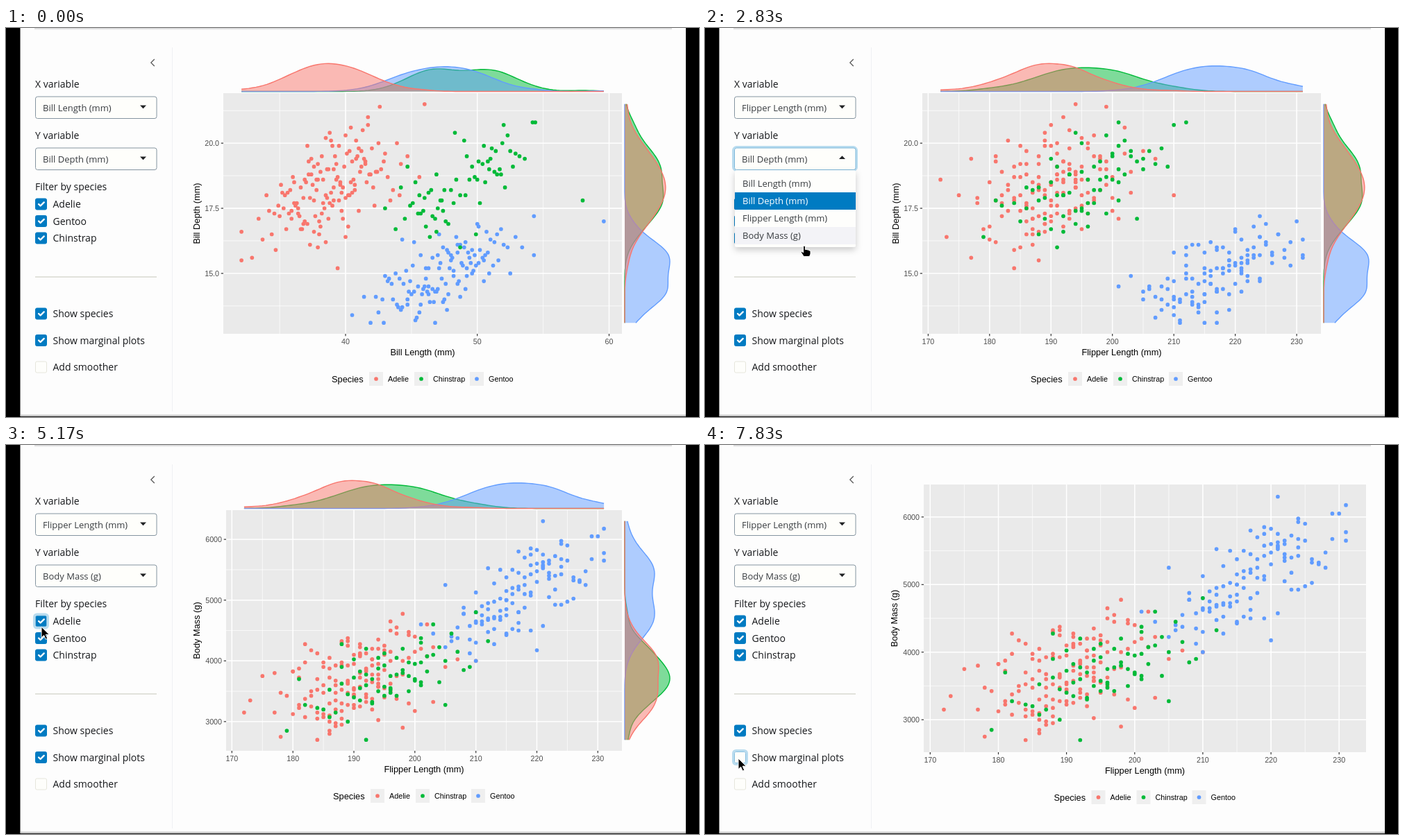
These frames come from a looping animation (998 px wide and 561 px high, 8000 ms). An HTML page:

```html
<!DOCTYPE html>
<html lang="en">
<head>
<meta charset="utf-8">
<title>Penguin explorer</title>
<style>
  html, body { margin: 0; width: 100%; height: 100%; overflow: hidden; background: #000; }
  svg { display: block; width: 100%; height: 100%; }
  text { white-space: pre; }
  #ui text { font-family: "Open Sans", "Noto Sans", sans-serif; font-size: 14px; fill: #15171a; }
  #ui .val { font-size: 13px; fill: #383c40; }
  #ui .picked { fill: #fff; }
  #plots text { font-family: "Liberation Sans", Arial, sans-serif; font-size: 12.8px; fill: #000; }
  #plots .small { font-size: 10.8px; }
  #plots .tick { font-size: 10.7px; fill: #4d4d4d; }
</style>
</head>
<body>
<svg viewBox="0 0 998 561" preserveAspectRatio="none">
  <defs>
    <filter id="shadow" x="-20%" y="-20%" width="140%" height="150%">
      <feDropShadow dx="0" dy="4" stdDeviation="5" flood-opacity=".2"/>
    </filter>
    <linearGradient id="fade" x2="0" y2="1">
      <stop offset="0" stop-color="#cfcfd0"/><stop offset="1" stop-color="#fdfdfd"/>
    </linearGradient>
  </defs>
  <rect width="998" height="561"/>
  <rect x="20.5" width="958.5" height="560" fill="#fdfdfd"/>
  <rect x="41" width="918" height="3" fill="url(#fade)"/>
  <path d="M239.5 28V553" stroke="#eff0f4"/>
  <path d="M20.5 558.5H979" stroke="#a3a3a3"/>
  <g id="plots"></g>
  <g id="ui"></g>
  <g id="cursor" stroke="#fff" stroke-width="1" stroke-linejoin="round"></g>
</svg>
<script>
const LOOP = 8000, STEP = LOOP / 48, GLIDE = 330;
const VARS = [
  { name: 'Bill Length (mm)', tick: 10, round: 0.1 },
  { name: 'Bill Depth (mm)', tick: 2.5, round: 0.1, digits: 1 },
  { name: 'Flipper Length (mm)', tick: 10, round: 1 },
  { name: 'Body Mass (g)', tick: 1000, round: 25 }
];
const HUES = { 2: ['#F8766D', '#00BFC4'], 3: ['#F8766D', '#00BA38', '#619CFF'] };

// Per variable: mean, half the gap between the sexes, spread within a sex.
// The extreme birds set the ends of the axes.
const SPECIES = [
  {
    name: 'Adelie', n: 146, width: 65,
    stats: [[38.8, 1.6, 2.1], [18.3, 0.72, 0.95], [190, 2.3, 6.1], [3700, 335, 305]],
    extremes: [[46, 21.5, 194, 4200], [32.1, 15.5, 188, 3050], [37.9, 18.6, 172, 3150], [44.1, 18, 210, 4000]]
  },
  {
    name: 'Gentoo', n: 119, width: 63,
    stats: [[47.4, 1.9, 2.1], [15, 0.74, 0.6], [217, 4.4, 4.7], [5080, 400, 290]],
    extremes: [[59.6, 17, 230, 6050], [49.2, 15.2, 221, 6300], [54.3, 15.7, 231, 5650], [42.9, 13.1, 215, 5000]]
  },
  {
    name: 'Chinstrap', n: 68, width: 80,
    stats: [[48.7, 2.25, 1.6], [18.4, 0.83, 0.72], [195.8, 4.1, 5.7], [3730, 205, 310]],
    extremes: [[58, 17.8, 181, 3700], [54.2, 20.8, 201, 4300], [46.9, 16.6, 192, 2700], [52, 20.7, 210, 4800]]
  }
];

let seed = 2024;
function rnd() {
  seed = (seed + 0x6D2B79F5) | 0;
  let r = Math.imul(seed ^ seed >>> 15, 1 | seed);
  r = r + Math.imul(r ^ r >>> 7, 61 | r) ^ r;
  return ((r ^ r >>> 14) >>> 0) / 4294967296;
}
// Inverse normal distribution, by Tukey's lambda.
const probit = u => (u ** 0.135 - (1 - u) ** 0.135) / 0.1975;
const range = n => Array.from({ length: n }, (_, i) => i);
const byName = (a, b) => a.name < b.name ? -1 : 1;
const extent = (rows, j) => [Math.min(...rows.map(r => r[j])), Math.max(...rows.map(r => r[j]))];
const f = v => v.toFixed(1);

const limits = VARS.map((_, j) => extent(SPECIES.flatMap(sp => sp.extremes), j));

// A shared size correlates the measurements; spacing the ranks evenly keeps each one normal.
function birds(sp, sex, n) {
  const z = range(n).map(() => {
    const size = probit(rnd());
    return VARS.map(() => 0.55 * size + 0.83 * probit(rnd()));
  });
  const rows = z.map(() => []);
  VARS.forEach(({ round }, j) => {
    const [mean, gap, sd] = sp.stats[j], [lo, hi] = limits[j];
    range(n).sort((a, b) => z[a][j] - z[b][j]).forEach((i, k) => {
      const v = mean + sex * gap + sd * probit((k + 0.5) / n);
      rows[i][j] = Math.min(hi, Math.max(lo, Math.round(v / round) * round));
    });
  });
  return rows;
}
SPECIES.forEach(sp => {
  const half = (sp.n - sp.extremes.length) >> 1;
  sp.rows = [...birds(sp, -1, half), ...birds(sp, 1, half), ...sp.extremes];
});

function density(vals, lo, hi) {
  const n = vals.length, s = [...vals].sort((a, b) => a - b);
  const mean = s.reduce((a, b) => a + b) / n;
  const sd = Math.sqrt(s.reduce((a, b) => a + (b - mean) ** 2, 0) / (n - 1));
  const iqr = s[Math.floor(n * 0.75)] - s[Math.floor(n * 0.25)];
  const bw = 0.9 * Math.min(sd, iqr / 1.34) * n ** -0.2;
  return range(101).map(i => {
    const x = lo + (hi - lo) * i / 100;
    return [x, s.reduce((a, v) => a + Math.exp(-0.5 * ((x - v) / bw) ** 2), 0) / (n * bw)];
  });
}

const rect = (x, y, w, h, fill, more = '') =>
  `<rect x="${f(x)}" y="${f(y)}" width="${f(w)}" height="${f(h)}" fill="${fill}" ${more}/>`;
const path = (d, stroke, w, more = 'fill="none"') =>
  `<path d="${d}" stroke="${stroke}" stroke-width="${w}" ${more}/>`;
const text = (x, y, s, more = '') => `<text x="${f(x)}" y="${f(y)}" ${more}>${s}</text>`;
const dot = (x, y, fill) => `<circle cx="${f(x)}" cy="${f(y)}" r="2.85" fill="${fill}"/>`;
const line = pts => 'M' + pts.map(p => p.map(f).join(' ')).join('L');

function plot({ x, y, box, groups = SPECIES, margin = 'density', colour = true }) {
  const [L, T, R, B] = box;
  const all = groups.flatMap(g => g.rows), sorted = [...groups].sort(byName);
  const hue = g => colour ? HUES[groups.length][sorted.indexOf(g)] : '#000';
  const [x0, x1] = extent(all, x), [y0, y1] = extent(all, y);
  const px = v => L + (R - L) * (0.05 + (v - x0) / (x1 - x0)) / 1.1;
  const py = v => B - (B - T) * (0.05 + (v - y0) / (y1 - y0)) / 1.1;
  const ticks = (lo, hi, step) => {
    const pad = (hi - lo) * 0.05, first = Math.ceil((lo - pad) / step);
    return range(Math.floor((hi + pad) / step) - first + 1).map(i => (first + i) * step);
  };
  let out = rect(L, T, R - L, B - T, '#EAEAEA');

  for (const [div, w] of [[2, 0.7], [1, 1.4]]) {
    const d = ticks(x0, x1, VARS[x].tick / div).map(v => `M${f(px(v))} ${T}V${B}`)
      .concat(ticks(y0, y1, VARS[y].tick / div).map(v => `M${L} ${f(py(v))}H${R}`));
    out += path(d.join(''), '#fff', w);
  }
  for (const v of ticks(x0, x1, VARS[x].tick)) {
    out += path(`M${f(px(v))} ${B}v3.3`, '#333', 1.2) +
      text(px(v), B + 14.8, v, 'class="tick" text-anchor="middle"');
  }
  for (const v of ticks(y0, y1, VARS[y].tick)) {
    out += path(`M${L} ${f(py(v))}h-3.3`, '#333', 1.2) +
      text(L - 6, py(v) + 3.9, v.toFixed(VARS[y].digits || 0), 'class="tick" text-anchor="end"');
  }
  for (const g of groups) out += g.rows.map(r => dot(px(r[x]), py(r[y]), hue(g))).join('');

  const cx = (L + R) / 2, cy = (T + B) / 2, yx = margin ? 278.8 : 277;
  out += text(cx, B + 30.5, VARS[x].name, 'text-anchor="middle"') +
    text(yx, cy, VARS[y].name, `text-anchor="middle" transform="rotate(-90 ${yx} ${cy})"`);

  if (colour) {
    const ly = B + 65;
    let lx = cx - (54 + groups.reduce((a, g) => a + g.width, 0)) / 2;
    out += text(lx, ly + 5, 'Species');
    lx += 54;
    for (const g of sorted) {
      out += rect(lx, ly - 10, 20, 20, '#EFEFEF') + dot(lx + 10, ly, hue(g)) +
        text(lx + 27, ly + 3.9, g.name, 'class="small"');
      lx += g.width;
    }
  }

  const top = T - 2.5, side = R + 4;
  const sides = [
    { j: x, lo: x0, hi: x1, at: (v, h) => [px(v), top - h * (top - 51.3)] },
    { j: y, lo: y0, hi: y1, at: (v, h) => [side + h * (956 - side), py(v)] }
  ];
  for (const { j, lo, hi, at } of margin ? sides : []) {
    if (margin === 'density') {
      const curves = groups.map(g => density(g.rows.map(r => r[j]), lo, hi));
      const peak = Math.max(...curves.flat().map(p => p[1]));
      groups.map((g, i) => {
        const pts = curves[i].map(([v, h]) => at(v, h / peak));
        return path(line([at(lo, 0), ...pts, at(hi, 0)]), 'none', 0, `fill="${hue(g)}" fill-opacity=".5"`) +
          path(line(pts), hue(g), 1.4);
      }).reverse().forEach(s => { out += s; });
    } else {
      const n = 29, w = (hi - lo) / n, bins = Array(n).fill(0);
      all.forEach(r => bins[Math.min(n - 1, Math.floor((r[j] - lo) / w))]++);
      const peak = Math.max(...bins);
      bins.forEach((c, i) => {
        const a = lo + i * w, h = c / peak;
        out += path(line([at(a, 0), at(a, h), at(a + w, h), at(a + w, 0)]) + 'Z', '#000', 1.4, 'fill="#595959"');
      });
    }
  }
  return out;
}

const MASS = { x: 2, y: 3, box: [317, 94, 887, 441] };
const PLOTS = {
  start: { x: 0, y: 1, box: [313, 94, 887, 441] },
  flipper: { x: 2, y: 1, box: [313, 94, 887, 441] },
  mass: MASS,
  subset: { ...MASS, groups: SPECIES.slice(1) },
  plain: { ...MASS, box: [317, 99, 887, 489], margin: 'bars', colour: false },
  bare: { ...MASS, box: [315, 57, 952, 443], margin: null }
};
const $ = id => document.getElementById(id);
$('plots').innerHTML = Object.entries(PLOTS)
  .map(([k, p]) => `<g id="plot-${k}" display="none">${plot(p)}</g>`).join('');

// State changes by time; "to" sends the cursor gliding to a place.
const EVENTS = [
  [0, { x: 0, y: 1, plot: 'start', adelie: true, species: true, marginal: true, to: [255, 250] }],
  [160, { to: [170, 117] }],
  [490, { hand: true }],
  [660, { open: 'x', focus: 'x', hover: 0 }],
  [830, { to: [163, 209] }],
  [1160, { hover: 2 }],
  [1490, { x: 2, open: '', hand: false }],
  [1660, { to: [152, 190] }],
  [1990, { plot: 'flipper', hand: true }],
  [2160, { open: 'y', focus: 'y', hover: 1, to: [143, 314] }],
  [2490, { hover: 3 }],
  [2990, { y: 3, open: '', hand: false }],
  [3160, { to: [52, 250] }],
  [3320, { plot: 'mass' }],
  [3820, { adelie: false, focus: 'adelie' }],
  [4320, { plot: 'subset' }],
  [4490, { adelie: true, to: [51, 262] }],
  [4990, { plot: 'mass' }],
  [5160, { to: [49, 408] }],
  [5490, { species: false, focus: 'species' }],
  [5820, { plot: 'plain' }],
  [6320, { species: true }],
  [6660, { plot: 'mass', to: [48, 452] }],
  [7160, { marginal: false, focus: 'marginal' }],
  [7660, { plot: 'bare' }]
];
const ARROW = '<path d="M0 0V15.6L3.6 12.2L6.1 18L8.7 16.9L6.2 11.2H11.2Z"/>';
const HAND = '<path d="M-1.4 1Q0 -1 1.4 1V5.6Q3.2 4.6 4.4 6Q6 5.4 7 6.8Q9 6.6 9 8.6V12L7.4 15.6H-.8L-4.6 9.6Q-4.4 7.6-2.4 9L-1.4 10Z"/>';

function select(key, y, s) {
  const on = s.focus === key, open = s.open === key, c = y + 16;
  return (on ? rect(40.5, y - 1.5, 178, 34, 'none', 'rx="5" stroke="#b9dcef" stroke-width="3"') : '') +
    rect(42.5, y, 174.5, 31.5, '#fefefb', `rx="3" stroke="${on ? '#7db7da' : '#8494a0'}"`) +
    text(53, c + 4.6, VARS[s[key]].name, 'class="val"') +
    path(open ? `M193 ${c}h9l-4.5 -4.8z` : `M193 ${c - 3.5}h9l-4.5 4.8z`, 'none', 0, 'fill="#202224"');
}

function menu(y, s) {
  return rect(43, y, 174, 111, '#fefefc', 'rx="3" filter="url(#shadow)"') + VARS.map((v, i) => {
    const top = y + 7 + i * 25, picked = i === s[s.open];
    const fill = picked ? '#007bc2' : i === s.hover ? '#f3f3f7' : 'none';
    return rect(43, top, 174, 25, fill) +
      text(54, top + 17.2, v.name, `class="val${picked ? ' picked' : ''}"`);
  }).join('');
}

function check(y, label, on, focus) {
  const border = focus ? '#86bfe0' : on ? '#007bc2' : '#e6e6dc';
  return (focus ? rect(40.5, y - 10, 20, 20, 'none', 'rx="4" stroke="#b9dcef" stroke-width="3"') : '') +
    rect(42.5, y - 8, 16, 16, on ? '#007bc2' : '#fefefb', `rx="2" stroke="${border}"`) +
    (on ? path(`M47.1 ${y}l2.5 2.5l5.1 -5.1`, '#fff', 2.4, 'fill="none" stroke-linecap="round" stroke-linejoin="round"') : '') +
    text(67.5, y + 5, label);
}

function panel(s) {
  return path('M213.8 45L208.8 50L213.8 55', '#555', 1.2) +
    text(42, 86, 'X variable') + select('x', 99, s) +
    text(42, 160.3, 'Y variable') + select('y', 173, s) +
    text(42, 234, 'Filter by species') +
    check(254, 'Adelie', s.adelie, s.focus === 'adelie') +
    check(278.5, 'Gentoo', true) + check(303, 'Chinstrap', true) +
    path('M42 359H217', '#c6c8ba', 1.2) +
    check(412, 'Show species', s.species, s.focus === 'species') +
    check(450.5, 'Show marginal plots', s.marginal, s.focus === 'marginal') +
    check(489, 'Add smoother', false) +
    (s.open ? menu(s.open === 'x' ? 131 : 205, s) : '');
}

function cursorAt(t) {
  const [[t1, { to: b }], [, { to: a }] = [0, { to: b }]] =
    EVENTS.filter(e => e[1].to && e[0] <= t).reverse();
  const u = Math.min(1, (t - t1) / GLIDE), ease = u * u * (3 - 2 * u);
  return a.map((v, i) => v + (b[i] - v) * ease);
}

let last = -1;
function draw(step) {
  const t = step * STEP;
  const s = Object.assign({}, ...EVENTS.filter(e => e[0] <= t).map(e => e[1]));
  for (const k in PLOTS) $('plot-' + k).setAttribute('display', k === s.plot ? 'inline' : 'none');
  $('ui').innerHTML = panel(s);
  const c = $('cursor');
  c.setAttribute('display', step ? 'inline' : 'none');
  c.setAttribute('transform', `translate(${cursorAt(t).map(f).join(' ')})`);
  c.innerHTML = s.hand ? HAND : ARROW;
}

const start = performance.now();
function tick() {
  const step = Math.floor(((performance.now() - start) % LOOP + 5) / STEP) % 48;
  if (step !== last) draw(last = step);
  requestAnimationFrame(tick);
}
tick();
</script>
</body>
</html>
```
